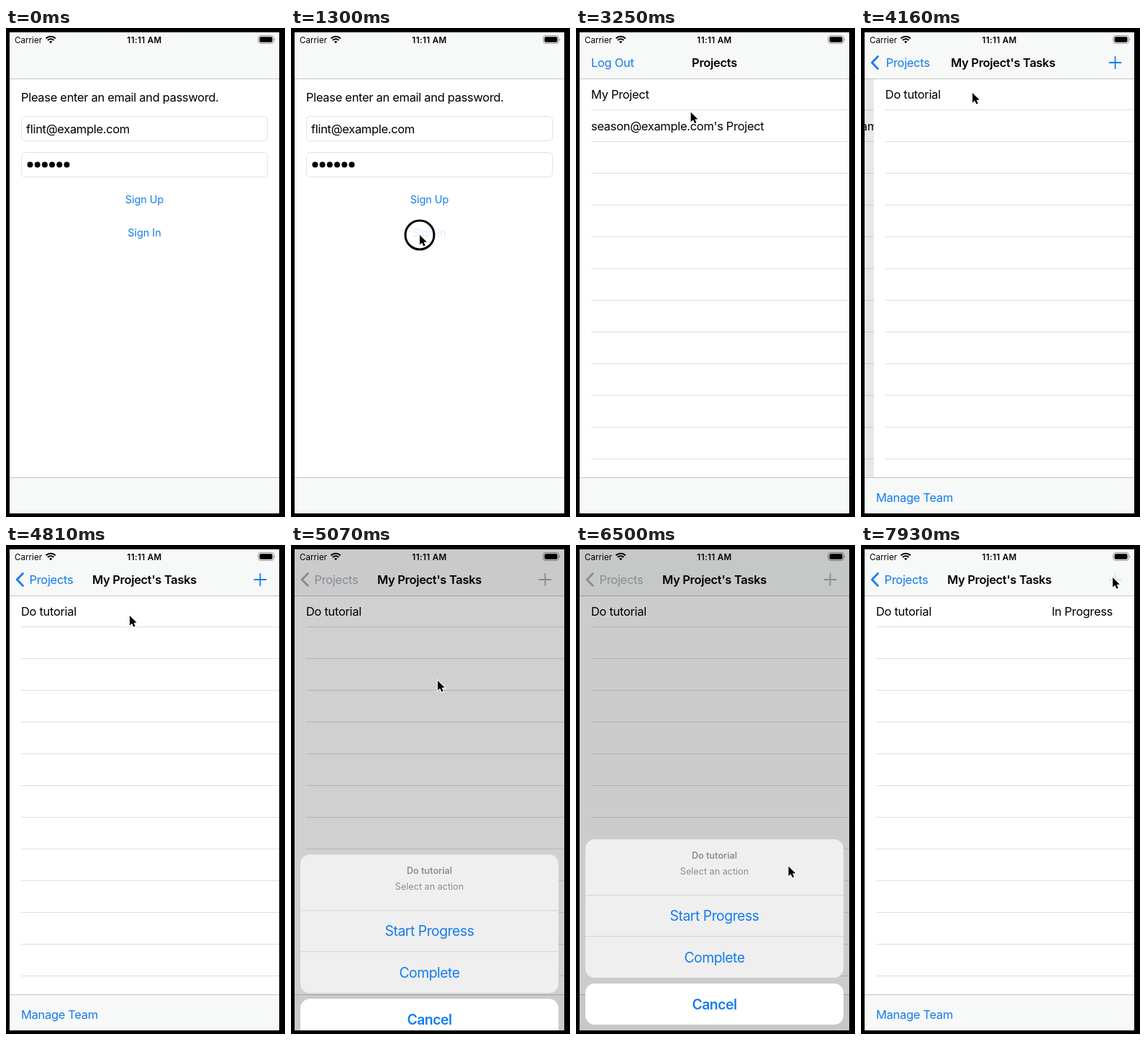
An HTML page for the animation above (8000 ms loop, 388x678 px).

```html
<!DOCTYPE html>
<html lang="en">
<head>
<meta charset="utf-8">
<title>Task app</title>
<style>
html, body { margin: 0; height: 100%; overflow: hidden; background: #000; }
svg { display: block; width: 388px; height: 678px; }
text { font-family: Inter, "Liberation Sans", sans-serif; white-space: pre; }
.tint { fill: currentColor; }
.icon { fill: none; stroke: currentColor; }
</style>
</head>
<body>
<script>
const LOOP = 8000, STEP = 130, WIDTH = 375;
const BLUE = '#147cee';
const SPACING = { 20: -.5, 17: -.31, 15: -.1 };

const label = (x, y, str, { size = 17, weight = 400, anchor = 'start', fill = '#000', cls = '', gap, id = '' } = {}) =>
  `<text id="${id}" class="${cls}" x="${x}" y="${y}" font-size="${(size * .97).toFixed(2)}" font-weight="${weight}"
    text-anchor="${anchor}" fill="${fill}" letter-spacing="${gap ?? SPACING[size] ?? 0}">${str}</text>`;
const mid = (y, str, opts) => label(192.5, y, str, { anchor: 'middle', ...opts });
const rect = (x, y, w, h, fill, more = '') =>
  `<rect x="${x}" y="${y}" width="${w}" height="${h}" fill="${fill}" ${more}/>`;
const list = n => Array.from({ length: n }, (_, i) => i);

const field = y => rect(21.5, y, 342, 34, '#fff', 'rx="5" stroke="#e2e2e2"');
const rows = list(12).map(i => rect(21, 113 + 44 * i, 359, 1, '#dedede')).join('');
const page = (id, body) =>
  `<g id="${id}">${rect(5, 70, WIDTH, 554, '#fff')}${body}${rect(5, 70, WIDTH, 554, '#000', `id="${id}Dim" opacity="0"`)}</g>`;
const title = { weight: 600 };
const sheetButton = { size: 20, fill: BLUE };

document.body.innerHTML = `<svg viewBox="0 0 388 678">
<defs>
  <clipPath id="phone">${rect(5, 6, WIDTH, 667, '#000')}</clipPath>
  <clipPath id="content">${rect(5, 70, WIDTH, 554, '#000')}</clipPath>
</defs>
${rect(0, 0, 388, 678, '#000')}
<g clip-path="url(#phone)">
  <g id="app">
    ${rect(5, 6, WIDTH, 667, '#f7f8f8')}
    <g clip-path="url(#content)">
      ${page('login',
        label(21, 102, 'Please enter an email and password.') +
        field(122.5) + label(28, 145.5, 'flint@example.com') + field(172.5) +
        list(6).map(i => `<circle cx="${33.5 + 10.2 * i}" cy="189.5" r="4"/>`).join('') +
        mid(243, 'Sign Up', { size: 15, cls: 'tint' }) +
        mid(289, 'Sign In', { size: 15, cls: 'tint', id: 'signIn' }))}
      ${page('projects', rows + label(21, 98, 'My Project') + label(21, 142, "season@example.com's Project"))}
      ${page('tasks', rows + label(21, 98, 'Do tutorial') +
        label(350, 98, 'In Progress', { anchor: 'end', id: 'status' }))}
    </g>
    ${rect(5, 70, WIDTH, 1, '#c4c4c4')}${rect(5, 623, WIDTH, 1, '#c4c4c4')}
    ${label(12, 20.5, 'Carrier', { size: 12 })}
    ${mid(20.5, '11:11 AM', { size: 12, weight: 600, gap: .35 })}
    <g fill="none" stroke="#000" stroke-width="2.1">
      <path d="M55.6 14.4a9.4 9.4 0 0 1 13.2 0M58 17a6 6 0 0 1 8.4 0"/>
      <path d="M62.2 21.3l-2.1-2.2a3 3 0 0 1 4.2 0z" fill="#000" stroke="none"/>
    </g>
    ${rect(350.8, 10.7, 21.4, 10.6, 'none', 'rx="3" stroke="#8a8a8a"')}
    ${rect(352.5, 12.3, 18, 7.4, '#000', 'rx="1.8"')}
    <path d="M373.4 14.2q2 1.8 0 3.6z" fill="#8a8a8a"/>
    <g id="projectsNav">${mid(54, 'Projects', { ...title, id: 'projectsTitle' })}${label(21, 54, 'Log Out', { cls: 'tint' })}</g>
    <g id="tasksNav">
      <path class="icon" stroke-width="2.7" stroke-linecap="round" stroke-linejoin="round" d="M23.5 39.5L15.2 48l8.3 8.5"/>
      ${label(32.5, 54, 'Projects', { cls: 'tint', id: 'back' })}
      ${mid(54, "My Project's Tasks", { ...title, id: 'tasksTitle' })}
      <path id="plus" class="icon" stroke-width="1.8" stroke-linecap="round" d="M345.5 48h16M353.5 40v16"/>
      ${label(21, 657, 'Manage Team', { cls: 'tint' })}
    </g>
  </g>
  ${rect(5, 6, WIDTH, 667, '#000', 'id="shade"')}
  <g id="sheet">
    ${rect(13, 408, 359, 192, '#efefef', 'rx="13"')}
    ${rect(13, 485, 359, 1, '#d3d3d3')}${rect(13, 542, 359, 1, '#d3d3d3')}
    ${mid(435, 'Do tutorial', { size: 13, weight: 600, fill: '#8e8e8e' })}
    ${mid(457, 'Select an action', { size: 13, fill: '#8e8e8e' })}
    ${mid(521, 'Start Progress', sheetButton)}${mid(578.5, 'Complete', sheetButton)}
    ${rect(13, 608, 359, 57, '#fff', 'rx="13"')}${mid(643.5, 'Cancel', { ...sheetButton, weight: 600 })}
  </g>
</g>
<g id="cursor">
  <circle id="ring" r="20" fill="none" stroke="#000" stroke-width="3"/>
  <path d="M0 0V13.6L3.2 10.7L5.4 15.6L7.7 14.6L5.6 9.8H9.8Z" stroke="#fff" stroke-width="2" paint-order="stroke"/>
</g>
</svg>`;

const $ = id => document.getElementById(id);
const move = (id, x, y = 0) => $(id).setAttribute('transform', `translate(${x.toFixed(2)} ${y.toFixed(2)})`);
const fade = (id, a) => $(id).setAttribute('opacity', a.toFixed(3));
const clamp = v => Math.max(0, Math.min(1, v));
const mix = (a, b, k) => a + (b - a) * k;

// Critically damped rise from 0 to 1
const spring = (ms, rate) => {
  const s = Math.max(0, ms) / 1000 * rate;
  return 1 - (1 + s) * Math.exp(-s);
};

// Pointer stops: time, x, y
const path = [
  [0, 214, 700], [130, 211, 664], [520, 193, 430], [780, 181, 320], [910, 179, 296], [1040, 179, 287],
  [1560, 179, 287], [2340, 186, 287], [2600, 183, 270], [3120, 162, 130], [3510, 155, 90], [4160, 155, 90],
  [4550, 162, 93], [4810, 172, 98], [5070, 204, 188], [5720, 217, 465], [6240, 216, 506], [6370, 216, 506],
  [6630, 375, 385], [6890, 376, 230], [7280, 355, 75], [7540, 350, 45], [LOOP, 350, 45]
];
const clicks = [[1300, 1560], [3510, 3770], [4550, 4810], [6370, 6500], [7670, 7930]];

function pointer(t) {
  const i = path.findIndex(p => p[0] > t);
  const [a, b] = [path[i - 1], path[i]];
  const k = (t - a[0]) / (b[0] - a[0]);
  return [mix(a[1], b[1], k), mix(a[2], b[2], k)];
}

function push(from, to, p) {
  move(to, WIDTH * (1 - p));
  move(from, -.3 * WIDTH * p);
  fade(from + 'Dim', .095 * p);
}

function draw(t) {
  const first = spring(t - 2040, 13), second = spring(t - 3760, 13);
  push('login', 'projects', first);
  push('projects', 'tasks', second);
  if (second === 0) move('projects', WIDTH * (1 - first));

  move('projectsTitle', 190 * (1 - first) - 130 * second);
  fade('projectsNav', clamp(first * 1.4 - .3) * clamp(1 - second * 1.6));
  move('tasksTitle', 150 * (1 - second));
  move('back', 65 * (1 - second));
  fade('tasksNav', clamp(second * 1.4 - .3));

  fade('signIn', t < 1300 ? 1 : mix(.15, 1, clamp((t - 1560) / 300)));
  fade('plus', t < 7670 ? 1 : .15);
  fade('status', t < 6760 ? 0 : 1);

  const up = spring(t - 4810, 16) - spring(t - 6500, 16);
  move('sheet', 0, 265 * (1 - up));
  fade('shade', .2 * up);
  const tint = [[20, 172], [124, 175], [238, 178]].map(([a, b]) => Math.round(mix(a, b, up)));
  $('app').style.color = `rgb(${tint})`;

  move('cursor', ...pointer(t));
  fade('ring', clicks.some(([a, b]) => t >= a && t < b) ? 1 : 0);
}

const start = performance.now();
function frame() {
  const t = (performance.now() - start) % LOOP;
  draw(Math.floor(t / STEP) * STEP);
  requestAnimationFrame(frame);
}
frame();
</script>
</body>
</html>
```
